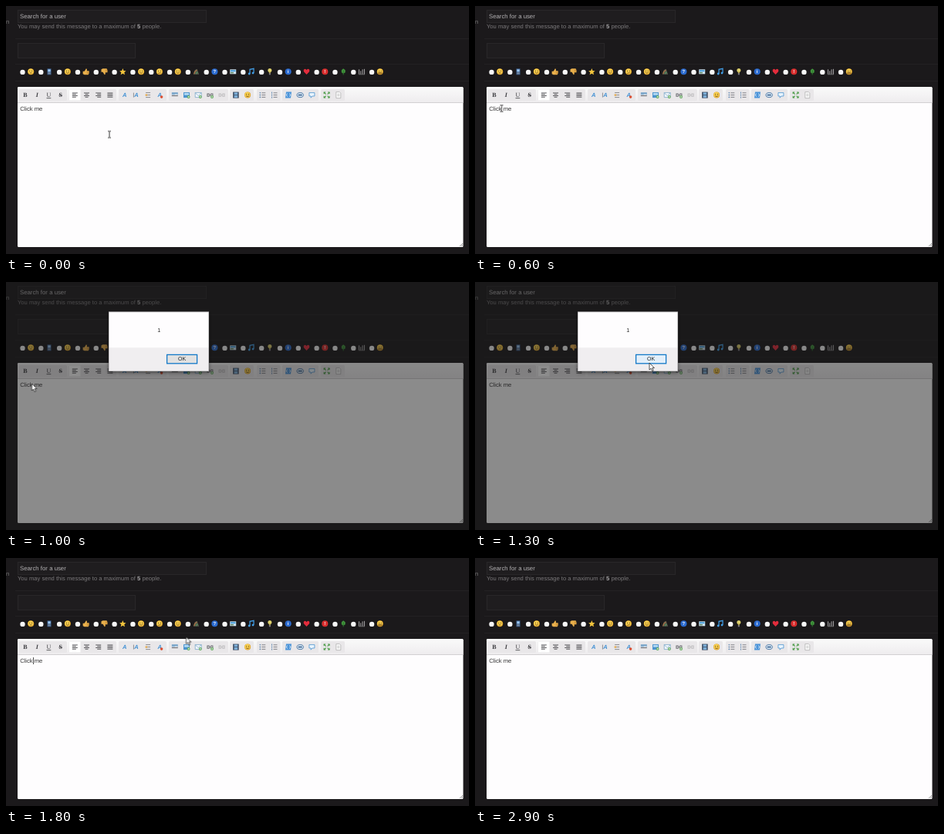
Write an HTML page that moves like this. It is 600 by 322 pixels and loops after 3.1 s.

```html
<!DOCTYPE html>
<html lang="en">
<head>
<meta charset="utf-8">
<title>Message editor</title>
<style>
  html, body { margin: 0; width: 100%; height: 100%; overflow: hidden; background: #1b191b; }
  svg { display: block; width: 100vw; height: 100vh; }
  text { font-family: "Liberation Sans", Arial, sans-serif; text-rendering: geometricPrecision; }
  .serif { font: 700 8px "Liberation Serif", "Times New Roman", serif; fill: #3c3c40; text-anchor: middle; }
  .mid { text-anchor: middle; }
  .timed { animation: 3100ms step-end infinite; }
  #modal { animation-name: modal; }
  #button { animation-name: button; }
  #focus { animation-name: focus; }
  #caret { animation-name: caret; }
  #ibeam { animation-name: ibeam; }
  #arrow { animation-name: arrow; }

  @keyframes modal {
    0%, 58.064% { visibility: hidden; }
    22.58% { visibility: visible; }
  }
  @keyframes button {
    0% { fill: #e1e1e1; }
    41.935% { fill: #e2effa; }
    45.161% { fill: #d3e8f9; }
    54.838% { fill: #c5dff5; }
  }
  @keyframes focus {
    0%, 58.064% { visibility: hidden; }
    54.838% { visibility: visible; }
  }
  @keyframes caret {
    0%, 74.193% { visibility: hidden; }
    58.064% { visibility: visible; }
  }
  @keyframes ibeam {
    0% { transform: translate(134px, 166.7px); visibility: visible; }
    3.225% { transform: translate(127px, 163px); }
    6.451% { transform: translate(106px, 154px); }
    9.677% { transform: translate(78px, 144px); }
    12.903% { transform: translate(53px, 138px); }
    16.129% { transform: translate(38px, 134px); }
    19.354% { transform: translate(34.5px, 133px); visibility: visible; }
    22.58% { visibility: hidden; }
    64.516% { transform: translate(290px, 170px); visibility: visible; }
    67.741% { transform: translate(350px, 235px); }
    70.967% { transform: translate(400px, 295px); visibility: visible; }
    74.193%, 100% { visibility: hidden; }
  }
  @keyframes arrow {
    0% { transform: translate(33.5px, 132px); visibility: hidden; }
    22.58% { transform: translate(33.5px, 132px); visibility: visible; }
    32.258% { transform: translate(33.5px, 132px); }
    35.483% { transform: translate(85px, 130px); }
    38.709% { transform: translate(176px, 121px); }
    41.935% { transform: translate(226px, 105px); }
    45.161% { transform: translate(233.5px, 102.5px); }
    61.29% { transform: translate(237px, 107px); visibility: visible; }
    64.516%, 100% { visibility: hidden; }
  }
</style>
</head>
<body>
<svg viewBox="0 0 600 322">
  <defs>
    <linearGradient id="bar" x2="0" y2="1">
      <stop stop-color="#fafafa"/><stop offset="1" stop-color="#eeecee"/>
    </linearGradient>
    <filter id="shadow" x="-10%" y="-10%" width="120%" height="125%">
      <feDropShadow dx="0" dy="1.5" stdDeviation="2.2" flood-opacity=".5"/>
    </filter>
  </defs>

  <rect width="600" height="322" fill="#1b191b"/>
  <path d="M12 42.5H600M12 75.5H600M12 97.5H600" stroke="#232123"/>
  <g fill="#1f1d1f" stroke="#292729">
    <rect x="15.5" y="5.5" width="244" height="16"/>
    <rect x="15.5" y="48.5" width="152" height="19"/>
  </g>
  <text x="0" y="22.5" font-size="7.6" fill="#777">n</text>
  <text x="18" y="16" font-size="7.8" fill="#b4b2b4">Search for a user</text>
  <text x="15" y="29.3" font-size="7.6" fill="#7b797b">You may send this message to a maximum of <tspan font-weight="700" fill="#a9a7a9">5</tspan> people.</text>
  <g id="prefixes"></g>

  <rect x="15" y="105" width="577.5" height="208" rx="1.5" fill="#fefdfe"/>
  <path d="M15 125.5V106.5Q15 105 16.5 105H591Q592.5 105 592.5 106.5V125.5Z" fill="url(#bar)"/>
  <path d="M15 125.5H592.5" stroke="#c9c7c9" stroke-width=".8"/>
  <g id="tools"></g>
  <path d="M588 312L592 308M590 312L592 310" stroke="#777" stroke-width=".7"/>
  <text x="18.2" y="136" font-size="7.6" fill="#333">Click me</text>
  <path id="caret" class="timed" d="M35.5 129V138" stroke="#222" stroke-width=".8"/>

  <g id="modal" class="timed">
    <rect width="600" height="322" fill="#1a1a1a" fill-opacity=".5"/>
    <rect x="133" y="38.7" width="130" height="77.3" fill="#fefdfe" filter="url(#shadow)"/>
    <rect x="133" y="85.3" width="130" height="30.7" fill="#f0eef0"/>
    <rect x="133.2" y="38.9" width="129.6" height="76.9" fill="none" stroke="#8d8b8d" stroke-width=".5"/>
    <text class="mid" x="198.2" y="64.7" font-size="7.2" fill="#222">1</text>
    <rect id="button" class="timed" x="208.6" y="94.4" width="39" height="11.4" stroke="#1278c8" stroke-width="1.3"/>
    <text class="mid" x="228" y="102.4" font-size="7" fill="#222">OK</text>
  </g>
  <rect id="focus" class="timed" x="210" y="95.8" width="36.2" height="8.6" fill="none" stroke="#456" stroke-width=".5" stroke-dasharray=".7 .7"/>

  <path id="ibeam" class="timed" d="M-2-4.2H-.6L0-3.7L.6-4.2H2M0-3.7V3.7M-2 4.2H-.6L0 3.7L.6 4.2H2" fill="none" stroke="#222" stroke-width=".9"/>
  <path id="arrow" class="timed" d="M0 0V9L2.1 7.2L3.7 10.6L5.2 9.9L3.7 6.6H6.4Z" fill="#fff" stroke="#111" stroke-width=".7"/>
</svg>
<script>
  const path = (d, fill, extra = '') => `<path d="${d}" fill="${fill}" ${extra}/>`;
  const line = (d, color, width = 1) => path(d, 'none', `stroke="${color}" stroke-width="${width}"`);
  const disc = (x, y, r, fill) => `<circle cx="${x}" cy="${y}" r="${r}" fill="${fill}"/>`;
  const box = (x, y, w, h, fill) => `<rect x="${x}" y="${y}" width="${w}" height="${h}" fill="${fill}"/>`;
  const label = (s, fill, size = 6) =>
    `<text class="mid" y="${size * .36}" font-size="${size}" font-weight="700" fill="${fill}">${s}</text>`;
  const at = (x, y, body) => `<g transform="translate(${x.toFixed(2)} ${y})">${body}</g>`;

  const face = mouth => disc(0, 0, 4, '#d99a24') + disc(-.2, -.4, 3.5, '#f7cf50') +
    disc(-1.4, -1, .6, '#5b3a10') + disc(1.4, -1, .6, '#5b3a10') + line(mouth, '#6b4212', .8);
  const smile = 'M-2 1Q0 3 2 1';
  const badge = (s, fill) => disc(0, 0, 4, fill) + label(s, '#fff');
  const thumb = path('M-4-.5H-2L.2-4Q1.6-4 1.2-1H4V2L3 4H-2L-4 3Z', '#e9b04c') +
    line('M1 .7H4M1 2.3H3.6', '#a96a20', .5);

  const prefixes = [
    face('M-1.5 1.6H1.5'),
    box(-2.5, -4, 5, 8, '#3d5f8e') + box(-1.7, -3, 3.4, 3, '#9cc6ee') + box(-1.7, 1, 3.4, 2, '#788a9d'),
    face(smile),
    thumb,
    `<g transform="scale(1 -1)">${thumb}</g>`,
    path('M0-4.2L1.2-1.3L4.2-1L2 1L2.7 4L0 2.4L-2.7 4L-2 1L-4.2-1L-1.2-1.3Z', '#f0c33c'),
    face(smile),
    face('M-2 2L2 1.4'),
    face(smile),
    path('M-3.5 3.5Q-3-3 1-3.5L3.5 3.5Z', '#5a5f52') + line('M-3 3Q-2-2 1-2', '#c0763c') + line('M0 3Q0 0 2 1', '#4f9a58'),
    badge('?', '#2b6bd0'),
    box(-4, -3, 8, 6, '#d5e5f1') + box(-3.3, -2.3, 6.6, 2.4, '#57a5dc') + box(-3.3, .7, 4, 1.4, '#648a63'),
    line('M-2 2.5V-3L3-4V1.5', '#42a0ea', 1.2) + disc(-2.8, 2.7, 1.4, '#42a0ea') + disc(2, 1.8, 1.4, '#42a0ea'),
    disc(0, -1.7, 2.5, '#ded06c') + box(-1, .2, 2, 2, '#bda94e') + box(-1, 2, 2, 2, '#83818a'),
    badge('i', '#2b6bd0'),
    path('M0 3.8L-3.6 0Q-4.5-3.5-1.8-3.5Q-.4-3.5 0-2Q.4-3.5 1.8-3.5Q4.5-3.5 3.6 0Z', '#e32c3c'),
    badge('!', '#d92d2d'),
    path('M0-4L2.5-2V1L0 2.5L-2.3 1V-2Z', '#43983e') + line('M0-2V4.2', '#286e2a'),
    line('M-3.5 3.5V-3M-1.2 3.5V-1M1.2 3.5V-3M3.5 3.5V-3.5', '#a9a7a9', 1) + line('M-4 3.5H4', '#777', .8),
    face('M-2 1H2V2.5H-2Z')
  ];
  document.querySelector('#prefixes').innerHTML = prefixes.map((icon, i) =>
    disc((21.5 + i * 23.82).toFixed(2), 85.9, 3.2, '#f7f7f7') + at(32.2 + i * 23.82, 85.3, icon)).join('');

  const serif = (s, style = '') => `<text class="serif" y="2.7" style="${style}">${s}</text>`;
  const rows = (...spans) => spans.map(([a, b], i) => line(`M${a} ${i * 1.8 - 2.7}H${b}`, '#4c4c50', .9)).join('');
  const full = [-3.5, 3.5];
  const letter = '<text class="mid" y="2.6" font-size="7.5" font-style="italic" font-weight="700" fill="#3f8fd3">A</text>';
  const plus = disc(2.6, 2.4, 1.9, '#59a653') + line('M1.5 2.4H3.7M2.6 1.3V3.5', '#fff', .6);
  const chain = line('M-.5-1.5H-3.5V1.5H-.5M.5-1.5H3.5V1.5H.5M-1.5 0H1.5', '#77777c', 1.1);
  const list = mark => mark + line('M-1-2.8H4M-1 0H4M-1 2.8H4', '#77777c', .9);
  const bubble = path('M-3.5-3H3.5V1.4H.5L-1.3 3.6V1.4H-3.5Z', '#eaf5fd', 'stroke="#4c94d0" stroke-width=".8"');

  const groups = [
    [17, 62, 25, [serif('B'), serif('I', 'font-style:italic'),
      serif('U', 'font-weight:400;text-decoration:underline'), serif('S', 'text-decoration:line-through')]],
    [81.5, 61.5, 89.3, [rows(full, [-3.5, 1.5], full, [-3.5, 1.5]), rows(full, [-2, 2], full, [-2, 2]),
      rows(full, [-1.5, 3.5], full, [-1.5, 3.5]), rows(full, full, full, full)]],
    [146, 62, 153.7, [letter, letter + line('M-3.5-3V3', '#77777c', .8),
      line('M-3-3H3M-1 0H3M-3 3H3', '#8a8a8e') + box(-3.5, -1, 2.5, 2, '#e3a33c'),
      letter + disc(2.3, 2.5, 1.8, '#dc5134')]],
    [211, 77, 218.8, [
      box(-4, -3.5, 8, 3.2, '#7fa9cc') + line('M-4 1H4', '#626267') + box(0, -1, 3, 1.4, '#e8e8e8'),
      box(-4, -3.5, 8, 7, '#4c94cf') + box(-3, -2.5, 6, 2.5, '#b8ddf5') + plus,
      path('M-4-3H4V3H-4Z', '#f4f8fb', 'stroke="#6d9fc4" stroke-width=".7"') + line('M-4-3L0 1L4-3', '#6d9fc4', .7) + plus,
      chain + plus, `<g opacity=".35">${chain}</g>`]],
    [290, 31, 297.9, [
      box(-3.8, -4, 7.6, 8, '#3f5068') + box(-2.2, -3.2, 4.4, 2.8, '#7fb2dc') + box(-2.2, .5, 4.4, 2.8, '#7fb2dc'),
      face(smile)]],
    [325, 30.5, 332.3, [
      list(disc(-3, -2.8, .8, '#4a78a8') + disc(-3, 0, .8, '#4a78a8') + disc(-3, 2.8, .8, '#4a78a8')),
      list(line('M-3-4V-1.9M-3-1V1M-3 2V4', '#4a78a8', .8))]],
    [358, 47, 366, [
      path('M-3-4H4L3 4H-4Z', '#4b94d9') + line('M-1.5-2L-2.5 0L-1.5 2M1.5-2L2.5 0L1.5 2', '#fff', .8),
      `<ellipse rx="4.2" ry="3" fill="#dbeaf5" stroke="#416c9c" stroke-width=".9"/>` + line('M-2.5 0H2.5', '#335c8d', 1.6),
      bubble]],
    [408, 31, 415.6, [
      line('M-1-1L-3.5-3.5M1-1L3.5-3.5M-1 1L-3.5 3.5M1 1L3.5 3.5', '#4b9b47', 1.2) +
        path('M-4-4H-1L-4-1ZM4-4H1L4-1ZM-4 4H-1L-4 1ZM4 4H1L4 1Z', '#4b9b47'),
      path('M-3-4H1.5L3-2.5V4H-3Z', '#fbfbfb', 'stroke="#aaa" stroke-width=".7"') + line('M-1.5-1H1.5M-1.5 1H1.5', '#aaa', .7)]]
  ];
  document.querySelector('#tools').innerHTML = groups.map(([x, width, first, icons], g) =>
    `<rect x="${x}" y="108" width="${width}" height="15" rx="1.5" fill="#e9e7e9"/>` +
    (g === 1 ? box(82, 108.5, 14.5, 14, '#fff') : '') +
    icons.map((icon, i) => at(first + i * 15.2, 115.6, icon)).join('')).join('');
</script>
</body>
</html>
```
